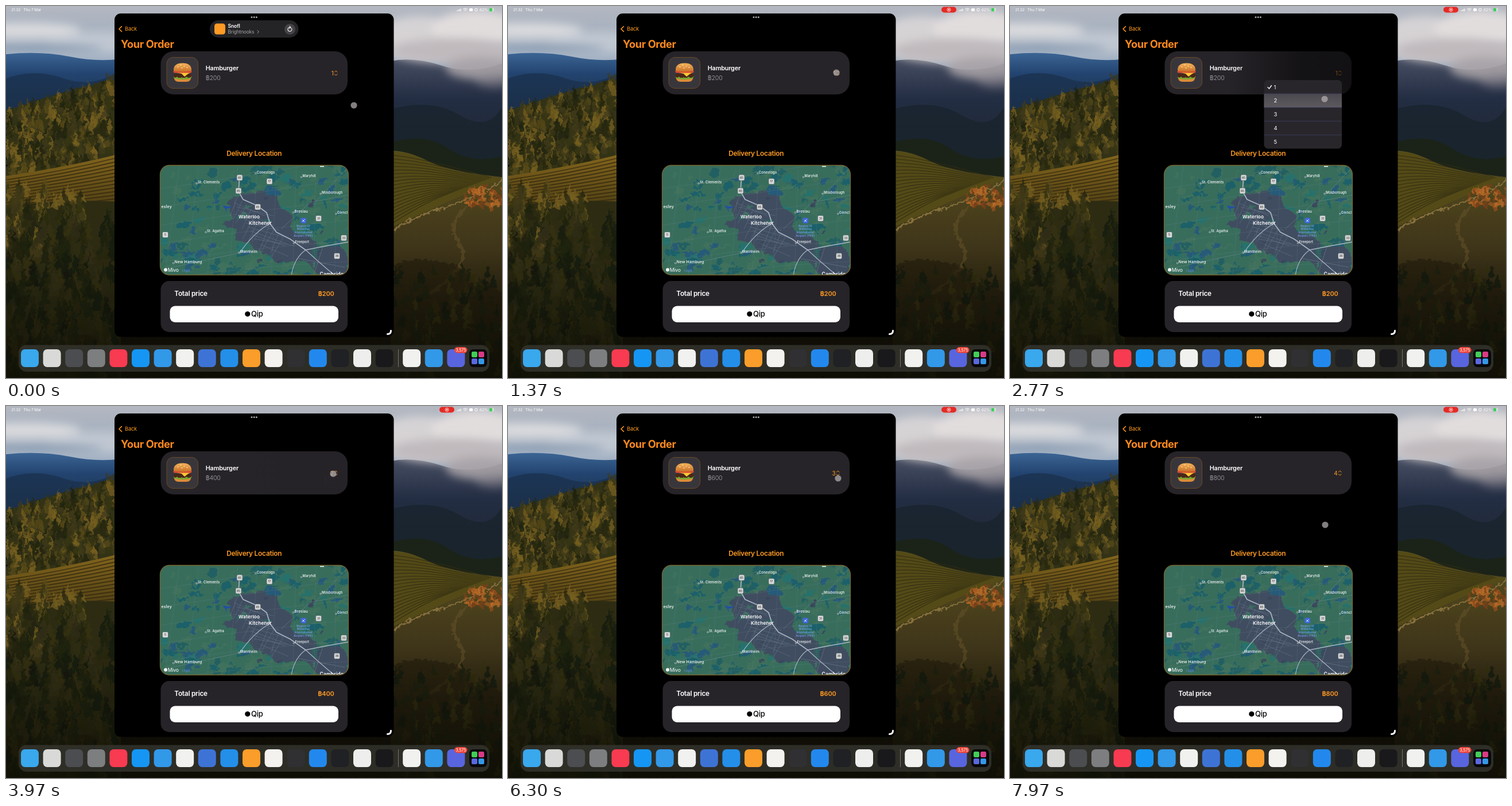
Recreate the animation shown at these times as an HTML page. Size 864 by 648 pixels, loop 8000 ms.

```html
<!DOCTYPE html>
<html lang="en">
<head>
<meta charset="utf-8">
<title>Order screen</title>
<style>
  html, body { margin: 0; width: 100%; height: 100%; overflow: hidden; background: #000; }
  svg { position: absolute; top: 0; left: 0; width: 864px; height: 648px; will-change: transform; }
  text { font-family: Inter, "Noto Sans", sans-serif; letter-spacing: -.02em; fill: #fff; white-space: pre; }
  .bold { font-weight: 600; }
  .orange { fill: #ff9b23; }
  .card { fill: #272429; }
  .line { fill: none; stroke-linecap: round; stroke-linejoin: round; }
</style>
</head>
<body>
<!-- Wallpaper -->
<svg viewBox="0 0 864 648">
  <defs>
    <linearGradient id="sky" x2="0" y2="1">
      <stop offset="0" stop-color="#b3b7c0"/><stop offset=".25" stop-color="#aab3c0"/>
      <stop offset=".55" stop-color="#bcc4cf"/><stop offset="1" stop-color="#7792b0"/>
    </linearGradient>
    <linearGradient id="blueHill" x2="0" y2="1">
      <stop offset="0" stop-color="#3c6594"/><stop offset=".3" stop-color="#234470"/><stop offset="1" stop-color="#1a2a3c"/>
    </linearGradient>
    <linearGradient id="darkHill" x2="0" y2="1">
      <stop offset="0" stop-color="#454d61"/><stop offset=".3" stop-color="#232d43"/><stop offset="1" stop-color="#1b2528"/>
    </linearGradient>
    <linearGradient id="vines" x2="0" y2="1">
      <stop offset="0" stop-color="#83651c"/><stop offset="1" stop-color="#453813"/>
    </linearGradient>
    <linearGradient id="slope" x2="0" y2="1">
      <stop offset="0" stop-color="#59501f"/><stop offset=".4" stop-color="#40361a"/><stop offset="1" stop-color="#17110a"/>
    </linearGradient>
    <linearGradient id="shade" x2="0" y2="1">
      <stop offset="0" stop-color="#0c0d05" stop-opacity="0"/><stop offset="1" stop-color="#0c0d05" stop-opacity=".75"/>
    </linearGradient>
    <filter id="soft" x="-40%" y="-60%" width="180%" height="220%"><feGaussianBlur stdDeviation="8"/></filter>
    <filter id="mist" x="-20%" y="-40%" width="140%" height="180%">
      <feGaussianBlur stdDeviation="9"/>
      <feTurbulence type="fractalNoise" baseFrequency=".025" numOctaves="3" seed="4" result="noise"/>
      <feDisplacementMap in2="noise" scale="0"/>
    </filter>
    <filter id="leafy" x="-5%" y="-5%" width="110%" height="110%">
      <feTurbulence type="fractalNoise" baseFrequency=".13" numOctaves="2" seed="8" result="noise"/>
      <feDisplacementMap in="SourceGraphic" in2="noise" scale="13" xChannelSelector="R" yChannelSelector="G"/>
      <feGaussianBlur stdDeviation=".7"/>
    </filter>
  </defs>
  <rect width="864" height="130" fill="url(#sky)"/>
  <g filter="url(#soft)">
    <ellipse cx="30" cy="42" rx="100" ry="13" fill="#d9dadd"/>
    <ellipse cx="150" cy="60" rx="80" ry="9" fill="#c3cad4"/>
    <ellipse cx="50" cy="73" rx="120" ry="7" fill="#8397ae"/>
    <ellipse cx="720" cy="55" rx="80" ry="38" fill="#d6d3d5"/>
    <ellipse cx="820" cy="40" rx="80" ry="32" fill="#e2dddd"/>
  </g>
  <path d="M0 84Q60 78 110 88T200 92V200H0Z" fill="url(#blueHill)"/>
  <path d="M0 126Q50 108 100 126T200 112V200H0Z" fill="#1a2f4b" opacity=".7"/>
  <path d="M670 96Q710 88 760 104T864 100V320H670Z" fill="url(#darkHill)"/>
  <path d="M670 180Q740 160 790 190T864 176V310H670Z" fill="#17232c" opacity=".7"/>
  <g filter="url(#soft)">
    <ellipse cx="780" cy="78" rx="110" ry="22" fill="#c0babd"/>
    <ellipse cx="828" cy="108" rx="62" ry="20" fill="#a9a3a8" opacity=".9"/>
    <ellipse cx="850" cy="130" rx="32" ry="11" fill="#85808a" opacity=".7"/>
  </g>
  <path d="M670 238Q730 220 770 248T864 262V320H670Z" fill="#1b2318"/>
  <path d="M0 182Q100 150 200 122V310H0Z" fill="#333213" filter="url(#leafy)"/>
  <g id="hillTrees" filter="url(#leafy)"></g>
  <path d="M0 296Q110 280 200 257V350Q100 345 0 372Z" fill="url(#vines)"/>
  <g id="leftRows" class="line" stroke="#33280f" stroke-width="1.8" opacity=".75"></g>
  <path d="M0 350Q90 335 200 341V648H0Z" fill="#2d2c13"/>
  <path d="M670 252Q700 252 735 270T864 298V648H670Z" fill="url(#slope)"/>
  <path d="M670 254Q700 252 740 273T864 300Q770 340 670 386Z" fill="#544a17"/>
  <g id="rightRows" class="line" stroke="#302c11" stroke-width="1.6" opacity=".65"></g>
  <g class="line" filter="url(#leafy)">
    <path d="M864 302Q840 326 770 348T670 394" stroke="#85703d" stroke-width="3"/>
    <path d="M800 352Q765 382 790 415T740 500" stroke="#665528" stroke-width="6" opacity=".5"/>
  </g>
  <path d="M675 450Q760 420 864 500V648H0V575H675Z" fill="#211c0c" opacity=".6" filter="url(#leafy)"/>
  <g id="nearTrees" filter="url(#leafy)"></g>
  <rect y="430" width="864" height="218" fill="url(#shade)"/>
</svg>

<svg viewBox="0 0 864 648">
  <defs>
    <linearGradient id="bun" x2="0" y2="1">
      <stop offset="0" stop-color="#f5b45a"/><stop offset="1" stop-color="#c8702a"/>
    </linearGradient>
    <linearGradient id="dim">
      <stop offset="0" stop-color="#000" stop-opacity="0"/><stop offset=".6" stop-color="#000" stop-opacity=".5"/>
      <stop offset="1" stop-color="#000" stop-opacity=".55"/>
    </linearGradient>
    <linearGradient id="hoverFill" x2="0" y2="1">
      <stop offset="0" stop-color="#4b484e"/><stop offset="1" stop-color="#5d5a5f"/>
    </linearGradient>
    <filter id="ragged" x="-5%" y="-5%" width="110%" height="110%">
      <feTurbulence type="fractalNoise" baseFrequency=".09" numOctaves="2" seed="3" result="noise"/>
      <feDisplacementMap in="SourceGraphic" in2="noise" scale="16" xChannelSelector="R" yChannelSelector="G"/>
    </filter>
    <clipPath id="mapClip"><rect x="268.5" y="277.5" width="328" height="191" rx="16"/></clipPath>
  </defs>

  <!-- Status bar -->
  <text x="9" y="9" font-size="6.7">21.32   Thu 7 Mar</text>
  <g id="recording"><rect x="755" y="1.5" width="26" height="10" rx="5" fill="#e52a25"/>
    <circle cx="768" cy="6.5" r="3" fill="none" stroke="#fff" stroke-width=".8"/><circle cx="768" cy="6.5" r="1.3" fill="#fff"/></g>
  <path d="M786 9V7.5M788 9V6.5M790 9V5.5M792 9V4.5" stroke="#fff" stroke-width="1.1"/>
  <path class="line" d="M796.5 5.5Q800 2.5 803.5 5.5M798 7.2Q800 5.5 802 7.2M800 9V8.8" stroke="#fff"/>
  <rect x="807" y="4" width="6" height="5" rx="1.5" fill="#fff"/>
  <circle cx="819" cy="6.5" r="2.3" fill="none" stroke="#fff"/>
  <text x="825" y="9" font-size="6.7">62%</text>
  <rect x="842" y="3.5" width="8" height="6" rx="1.8" fill="#d7dfd5"/><rect x="842" y="3.5" width="5" height="6" rx="1.8" fill="#36d05b"/>

  <!-- Window -->
  <rect x="189" y="13" width="486.500" height="563.500" rx="11"/>
  <g fill="#a5a5a8"><circle cx="428" cy="19.5" r="1.5"/><circle cx="432.2" cy="19.5" r="1.5"/><circle cx="436.4" cy="19.5" r="1.5"/></g>
  <path class="line" d="M664.5 571.5Q670.5 571.5 670.5 565.5" stroke="#fff" stroke-width="3"/>
  <path class="line" d="M201.5 35.5L197 40L201.5 44.5" stroke="#ff9b23" stroke-width="1.5"/>
  <text class="orange" x="207" y="43.3" font-size="9.3">Back</text>
  <text x="200" y="73.3" font-size="18.2" font-weight="700" style="fill:#ff8a1c">Your Order</text>

  <g id="banner">
    <rect x="355" y="25" width="154.5" height="30" rx="15" fill="#242326"/>
    <rect x="363" y="30.5" width="19" height="19" rx="4.5" fill="#ff9a24"/>
    <text class="bold" x="386.5" y="38.3" font-size="8.7">Snofl</text>
    <text x="386.5" y="48" font-size="8.4" style="fill:#a5a3a8">Brightnooks</text>
    <path class="line" d="M438 42.5L440.5 45L438 47.5" stroke="#a5a3a8"/>
    <circle cx="494.5" cy="40.5" r="9.5" fill="#454347"/>
    <path class="line" d="M497.3 38.7A3.5 3.5 0 1 1 494.5 37.2M494 35.3L496 37.2L494 39" stroke="#fff" stroke-width="1.1"/>
  </g>

  <!-- Order row -->
  <rect class="card" x="269.5" y="79" width="325.5" height="75" rx="22"/>
  <rect x="280" y="89.5" width="54.5" height="54" rx="11" fill="#39363b" stroke="#674b25"/>
  <g>
    <path d="M292.5 123H322.5Q322.500 132 314 132H301Q292.500 132 292.500 123Z" fill="#dc8b39"/>
    <rect x="291.5" y="118" width="32" height="7" rx="3.5" fill="#4b2718"/>
    <path d="M292 115H323L316 119L311 123L306 118Z" fill="#ffc937"/>
    <path d="M291 122Q294 127 298 123Q302 128 306 124Q310 128 314 123Q320 128 324 121L322 126Q307 130 293 126Z" fill="#71a832"/>
    <rect x="291.5" y="112.5" width="32" height="4" rx="2" fill="#d94b31"/>
    <path d="M292 113Q291 99.5 307.5 99.5T323 113Q308 116 292 113Z" fill="url(#bun)"/>
    <path class="line" d="M299 106h1M304 103h1M310 105h1M315 107h1M306 108h1" stroke="#ffe2a3" stroke-width="1.3"/>
  </g>
  <text class="bold" x="347.7" y="112.3" font-size="10.9">Hamburger</text>
  <text id="itemPrice" x="347.7" y="128.5" font-size="10.7" font-weight="300" style="fill:#aaa7ad"></text>
  <g id="stepper" fill="#ff9b23" stroke="#ff9b23">
    <text id="quantity" x="570.5" y="120.7" font-size="10" text-anchor="end" stroke="none" style="fill:inherit"></text>
    <path class="line" d="M572.3 115.2L574.7 112.8L577.1 115.2M572.3 118.6L574.7 121L577.1 118.6"/>
  </g>

  <!-- Map -->
  <text class="bold orange" x="432.3" y="260.6" font-size="11.9" text-anchor="middle">Delivery Location</text>
  <g clip-path="url(#mapClip)">
    <rect x="268" y="277" width="329" height="192" fill="#386d5c"/>
    <g filter="url(#ragged)">
      <g id="patches"></g>
      <path d="M384 341L406 328L446 321L470 330L478 351L499 365L497 395L524 399L550 421L579 416L596 440V469H546L518 442L476 450L455 432L432 428L424 411L397 407L402 388L374 382L395 367Z" fill="#414d60"/>
      <g id="parks"></g>
    </g>
    <g id="streets" class="line" stroke="#7e91a2" stroke-width=".6"></g>
    <g class="line" stroke="#a9b4c3" stroke-width="1.7">
      <path d="M407 294L405 323L413 337L438 348L454 360L460 379L471 394L495 406L522 425L557 418L597 411"/>
      <path d="M522 425Q502 439 497 469M460 379Q432 394 407 430M522 425L543 444L572 469" stroke-width="1.2"/>
    </g>
    <g id="labels"></g>
    <rect x="513.5" y="369" width="9.5" height="9.5" rx="2" fill="#3e68dc"/><path d="M516 376L520.5 371.5M516.5 372.5L520 376" stroke="#dbe5ff"/>
    <circle cx="278" cy="459.5" r="2.9" fill="#fff"/>
    <text x="281.8" y="462.7" font-size="8.6">Mivo</text>
    <text x="307" y="462.5" font-size="5.5" style="fill:#5e8cc8">Legal</text>
    <path d="M547 279.5H554" stroke="#fff" stroke-width="1.3"/>
  </g>
  <rect x="268.5" y="277.5" width="328" height="191" rx="16" fill="none" stroke="#77652f" stroke-width="1.3"/>

  <!-- Total -->
  <rect class="card" x="269.5" y="479" width="325.5" height="89" rx="15"/>
  <text class="bold" x="293.3" y="505" font-size="11.8">Total price</text>
  <text id="total" class="bold orange" x="571.5" y="504.7" font-size="11" text-anchor="end"></text>
  <rect x="285.5" y="522.5" width="293.5" height="28.5" rx="9" fill="#fff"/>
  <circle cx="420.8" cy="536.5" r="4.6"/>
  <text x="427" y="540.7" font-size="13" font-weight="500" style="fill:#000">Qip</text>

  <path id="cardDim" d="M380 79H573A22 22 0 0 1 595 101V132A22 22 0 0 1 573 154H380Z" fill="url(#dim)"/>
  <g id="menu"></g>

  <!-- Dock -->
  <rect x="22" y="590.5" width="820" height="46.5" rx="14" fill="#35352f" opacity=".82"/>
  <path d="M683.5 598V629" stroke="#72746d"/>
  <g id="dock"></g>
  <rect x="781" y="594" width="22.5" height="10.5" rx="5.25" fill="#ee4439"/>
  <text x="792.3" y="601.7" font-size="7.2" text-anchor="middle">3,575</text>

  <circle id="pointer" r="5.6" fill="#b5b0b0" opacity=".72"/>
</svg>
<script>
const $ = id => document.getElementById(id);
const fill = (id, markup) => { $(id).innerHTML = markup; };
const repeat = (n, draw) => Array.from({ length: n }, (_, i) => draw(i)).join('');

let seed = 21;
const random = (a = 0, b = 1) => {
  seed = (seed * 1664525 + 1013904223) % 4294967296;
  return a + (b - a) * seed / 4294967296;
};
const pick = list => list[Math.floor(random(0, list.length))];

// Wallpaper texture
function trees(count, left, right, top, bottom, size, colors) {
  return repeat(count, i => {
    const x = random(left, right), low = top(x), h = random(.65, 1.3) * size;
    const y = low + (bottom - low) * i / count, w = h * random(.22, .36);
    return `<path d="M${x} ${y - h / 2}L${x + w} ${y + h / 2}H${x - w}Z" fill="${pick(colors)}" opacity=".75"/>`;
  });
}
const olive = ['#57491a', '#40391a', '#2a2a12', '#1f2310', '#776020', '#373414'];
const shadow = ['#161a0c', '#1e200f', '#2b2a13', '#191f0f', '#373214'];
fill('hillTrees', trees(330, 0, 192, x => 184 - x * .33, 290, 23, olive));
fill('nearTrees',
  trees(50, 0, 70, () => 310, 430, 30, olive) +
  trees(30, 85, 135, () => 325, 375, 26, olive) +
  trees(220, 0, 192, x => 400 - x * .2, 645, 40, shadow) +
  trees(110, 675, 864, () => 455, 640, 22, shadow) +
  repeat(80, () => {
    const angle = random(0, 6.28), r = Math.sqrt(random());
    return `<circle cx="${837 + 40 * r * Math.cos(angle)}" cy="${333 + 20 * r * Math.sin(angle)}" r="${random(2, 5)}" fill="${pick(['#a05a20', '#7c421a', '#b96c2a'])}" opacity=".75"/>`;
  }));
fill('leftRows', repeat(13, i => `<path d="M0 ${303 + i * 5}Q100 ${288 + i * 5.3} 195 ${264 + i * 6.5}"/>`));
fill('rightRows', repeat(19, i => `<path d="M675 ${260 + i * 6.5}Q735 ${267 + i * 4} ${845 - i * 4} ${299 + i * 1.5}"/>`));

// Map
const block = (x, y, w, h, color) =>
  `<path d="M${x} ${y}h${w}v${h * .6}h${-w * .4}v${h * .4}h${-w * .8}v${-h * .5}h${w * .2}Z" fill="${color}"/>`;
fill('patches', repeat(190, () =>
  block(random(264, 596), random(274, 467), random(5, 22), random(4, 13),
    pick(['#1d6069', '#1d6069', '#205e62', '#26716c', '#285a78', '#3f715b', '#3f715b']))) +
  '<path d="M380 348L391 349L385 357Z" fill="#254fa2"/>');
fill('parks', repeat(22, () =>
  block(random(400, 560), random(330, 460), random(4, 10), random(3, 8), pick(['#386d5c', '#2e635f', '#37445a']))));
fill('streets',
  repeat(11, i => `<path d="M${268 + i * 34} 277L${240 + i * 37} 469" opacity=".25"/>`) +
  repeat(6, i => `<path d="M268 ${318 + i * 32}Q400 ${300 + i * 31} 597 ${265 + i * 36}" opacity=".3"/>`) +
  repeat(11, i => `<path d="M${403 + i * 8} ${333 + i * 7}l${random(-25, -12)} ${random(30, 48)}M${398 + i * 4} ${343 + i * 7}l${random(45, 70)} ${random(10, 25)}" opacity=".55"/>`) +
  '<path d="M540 340L597 280M480 388L530 342L597 329M510 440L590 455M536 469L552 419M291 455L407 430" opacity=".7"/>');

const label = (x, y, text, size = 5.8, style = '') =>
  `<text x="${x}" y="${y}" font-size="${size}" font-weight="500" style="letter-spacing:.02em;${style}">${text}</text>`;
const towns = [['St. Clements', 334, 309, 6.1], ['Conestogo', 437, 291.5], ['Maryhill', 516.5, 298],
  ['Mosborough', 550, 327], ['Breslau', 502.5, 359.5, 6.3], ['Glencl', 577, 362],
  ['St. Agatha', 350, 394], ['Freeport', 503.5, 413], ['Mannheim', 408, 429.5], ['New Hamburg', 293.5, 448, 6.8]];
const shields = [[85, 407, 299], [17, 459, 305.5], [85, 405, 322], [85, 438.5, 350],
  [31, 544.5, 370], [5, 277.5, 398.5], [33, 588.5, 404], [36, 576.5, 435.5]];
fill('labels',
  towns.map(([name, x, y, size]) =>
    `<circle cx="${x - 2}" cy="${y}" r="1.2" fill="#263d43" stroke="#fff" stroke-width=".6"/>` + label(x, y, name, size)).join('') +
  label(270.5, 352, 'esley', 7) +
  label(405, 370, 'Waterloo', 8.2, 'font-weight:600') + label(423, 381, 'Kitchener', 8.2, 'font-weight:600') +
  label(546.5, 470, 'Cambridge', 8.5, 'font-weight:600') +
  ['Region of', 'Waterloo', 'International', 'Airport (YKF)'].map((line, i) =>
    label(518, 384.5 + i * 5.8, line, 5, 'fill:#78a5ff;text-anchor:middle')).join('') +
  shields.map(([number, x, y]) =>
    `<rect x="${x - 5}" y="${y - 5}" width="10" height="10" rx="2" fill="#d6d8d8" stroke="#525d61" stroke-width=".6"/>` +
    label(x, y + 1.8, number, 4.8, 'fill:#333;text-anchor:middle')).join(''));

// Dock tiles
const tiles = ['#39a8ed', '#d9d9d8', '#4b4d50', '#7d7e80', '#f83b50', '#1596f4', '#3298e8', '#f1f1ef', '#3e73d6',
  '#238fe9', '#fb9d2a', '#f4f2ef', '#303033', '#2388ed', '#202124', '#eeeeed', '#19191b',
  '#f1f1ef', '#3298e8', '#5865df', '#080809'];
const tile = (x, y, size, color) =>
  `<rect x="${x}" y="${y}" width="${size}" height="${size}" rx="${size * .23}" fill="${color}"/>`;
fill('dock', tiles.map((color, i) => tile(26 + i * 38.6 + (i > 16 ? 9 : 0), 598, 31, color)).join('') +
  ['#43cd57', '#d93b86', '#5c68df', '#3697e7'].map((color, i) =>
    tile(811 + i % 2 * 12, 602 + (i >> 1) * 12, 10, color)).join(''));

// Quantity menu
const ROW = 23.9, MENU = { left: 442.5, top: 129, width: 135.5 };
fill('menu', `<rect x="${MENU.left}" y="${MENU.top}" width="${MENU.width}" height="${ROW * 5}" rx="7" fill="#29262b"/>
  <rect id="hover" x="${MENU.left}" width="${MENU.width}" height="${ROW}" fill="url(#hoverFill)"/>` +
  repeat(4, i => `<path d="M${MENU.left} ${MENU.top + (i + 1) * ROW}h${MENU.width}" stroke="#3b4065" stroke-width=".8"/>`) +
  repeat(5, i => `<text x="459.5" y="${144.5 + i * ROW}" font-size="9.5">${i + 1}</text>`) +
  '<path id="check" class="line" d="M449 141.5L451.5 144L455.5 138.5" stroke="#fff" stroke-width="1.3"/>');

// Timeline
const pointerPath = [[0, 606, 173], [350, 606, 173], [1300, 572, 116], [1550, 572, 116], [2500, 548, 162],
  [3000, 548, 162], [3800, 570, 118], [4200, 570, 118], [5050, 561, 172], [5300, 561, 175], [5520, 553, 190],
  [5750, 553, 190], [6300, 575, 126], [6500, 571, 118], [6750, 571, 118], [7250, 549, 212],
  [7500, 549, 211], [7800, 549, 207], [8000, 549, 207]];
const menuTimes = [[1410, 2950], [3930, 5650], [6550, 7400]];

const clamp = v => Math.max(0, Math.min(1, v));
const ease = v => v * v * (3 - 2 * v);
const ramp = (t, start, length) => ease(clamp((t - start) / length));

function pointerAt(t) {
  const i = pointerPath.findIndex(key => key[0] > t);
  const [t0, x0, y0] = pointerPath[i - 1], [t1, x1, y1] = pointerPath[i];
  const p = ease((t - t0) / (t1 - t0));
  return [x0 + (x1 - x0) * p, y0 + (y1 - y0) * p];
}

function draw() {
  const t = performance.now() % 8000;
  const [x, y] = pointerAt(t);
  $('pointer').setAttribute('transform', `translate(${x} ${y})`);
  $('banner').setAttribute('opacity', 1 - ramp(t, 650, 250));
  $('recording').setAttribute('opacity', ramp(t, 400, 150));

  const quantity = 1 + menuTimes.filter(([, close]) => t >= close + 40).length;
  const price = '฿' + quantity * 200;
  $('quantity').textContent = quantity;
  $('itemPrice').textContent = $('total').textContent = price;

  const open = Math.max(...menuTimes.map(([start, end]) => ramp(t, start, 260) * (1 - ramp(t, end, 220))));
  const scale = .08 + .92 * open;
  $('cardDim').setAttribute('opacity', open);
  $('menu').setAttribute('opacity', clamp(open * 3));
  $('menu').setAttribute('transform', `translate(${572 * (1 - scale)} ${119 * (1 - scale)}) scale(${scale})`);
  const row = Math.floor((y - MENU.top) / ROW);
  $('hover').setAttribute('y', MENU.top + row * ROW);
  $('hover').setAttribute('opacity', row > 0 && row < 4 ? 1 : 0);
  $('check').setAttribute('transform', `translate(0 ${(quantity - 1) * ROW})`);
  requestAnimationFrame(draw);
}
draw();
</script>
</body>
</html>
```
